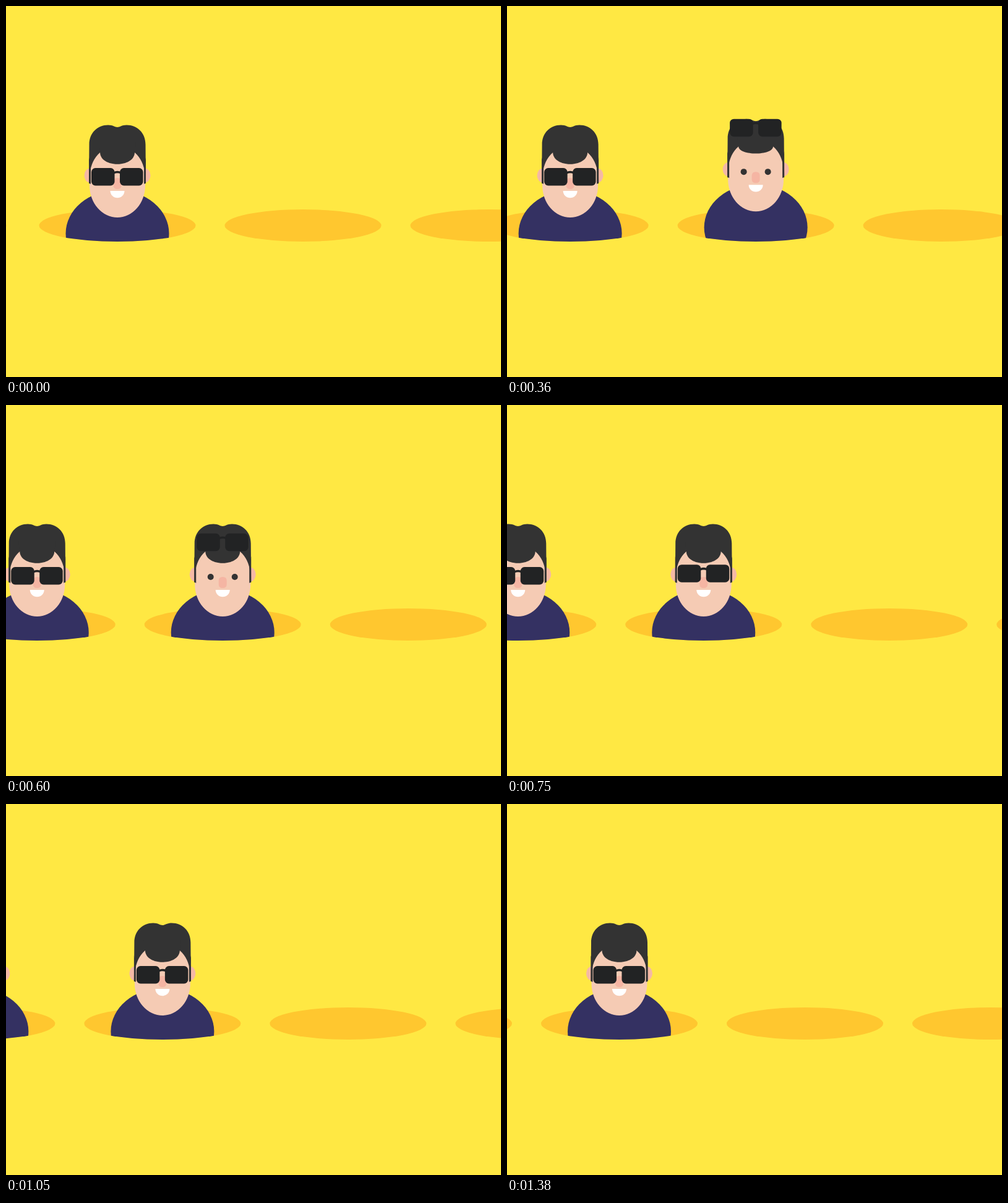
Animation, 800 px wide and 600 px high, one loop 1410 ms. Source, as an HTML page:

```html
<!DOCTYPE html>
<html lang="en">
<head>
<meta charset="utf-8">
<title>Pop up</title>
<style>
  html, body { margin: 0; width: 100%; height: 100%; overflow: hidden; background: #ffe843; }
  svg { display: block; width: 100vw; height: 100vh; }
</style>
</head>
<body>
<svg viewBox="0 0 800 600">
  <defs>
    <ellipse id="hole" cy="355" rx="126.5" ry="26" fill="#ffc72f"/>
    <clipPath id="above">
      <path d="M-126.5 -50H126.5V355A126.5 26 0 0 1 -126.5 355Z"/>
    </clipPath>
    <g id="back">
      <ellipse cy="368" rx="83.5" ry="70" fill="#343162"/>
      <g fill="#f5b9a5">
        <ellipse cx="-44" cy="274" rx="9.5" ry="11.5"/>
        <ellipse cx="44" cy="274" rx="9.5" ry="11.5"/>
      </g>
      <path fill="#333" d="M-46 287L-45.5 224C-45.5 205 -32 192.5 -15 192.5C-7 192.5 -4 196 0 196C4 196 7 192.5 15 192.5C32 192.5 45.5 205 45.5 224L46 287L43 288H-43Z"/>
      <path fill="#f5cbb4" d="M-44.5 275A44.5 49 0 0 1 44.5 275L45 290A45 52 0 0 1 -45 290Z"/>
      <path fill="#333" d="M-46 245L-43 257V288L-46 286ZM46 245L43 257V288L46 286Z"/>
      <circle cx="-19.5" cy="278" r="5" fill="#333"/>
      <circle cx="19.5" cy="278" r="5" fill="#333"/>
      <path fill="#f5b5a3" d="M-6.5 284Q-6.5 278 0 278Q6.5 278 6.5 284V290Q6.5 296 0 296Q-6.5 296 -6.5 290Z"/>
      <path fill="#fff" d="M-11.5 299H11.5A11.5 11.3 0 0 1 -11.5 299Z"/>
    </g>
    <g id="shades" fill="#222324">
      <rect x="-42" y="262" width="37.5" height="28.5" rx="6.5"/>
      <rect x="4" y="262" width="37.5" height="28.5" rx="6.5"/>
      <path d="M-6 270Q0 267 6 270" fill="none" stroke="#222324" stroke-width="3.5"/>
    </g>
  </defs>
  <rect width="800" height="600" fill="#ffe843"/>
  <use href="#hole" x="-126"/>
  <g id="row"></g>
</svg>
<script>
const LOOP = 1410, STEP = 30, SPEED = 298.5 / 1380;
const row = document.getElementById('row');

const spot = (x, inside) => `<g transform="translate(${x})"><use href="#hole"/>${inside}</g>`;
const person = id => `<g clip-path="url(#above)"><g id="${id}">
  <use href="#back"/><path class="fringe" fill="#333"/><use class="glasses" href="#shades"/></g></g>`;

row.innerHTML = spot(180, person('first')) + spot(480, person('second')) + spot(780, '') + spot(1080, '');

// Cubic ease in and out between two times
function ease(t, from, to) {
  const p = Math.min(1, Math.max(0, (t - from) / (to - from)));
  return p < 0.5 ? 4 * p ** 3 : 1 - 4 * (1 - p) ** 3;
}

function pose(id, y, lift, flat) {
  const el = document.getElementById(id);
  const c = 262 - flat;
  el.setAttribute('transform', `translate(0 ${y})`);
  el.querySelector('.glasses').setAttribute('transform', `translate(0 ${lift})`);
  el.querySelector('.fringe').setAttribute('d',
    `M-28 237C-27 ${c} 27 ${c} 28 237L30 220H-30Z`);
}

function draw(t) {
  row.setAttribute('transform', `translate(${-SPEED * t})`);
  const rise = 200 - 210.5 * ease(t, 0, 270);
  const settle = 10.5 * ease(t, 300, 540);
  pose('second', rise + settle, -69.5 * (1 - ease(t, 450, 845)), 10 * (1 - ease(t, 330, 570)));
}

pose('first', 0, 0, 0);
draw(0);

const start = performance.now();
function tick() {
  const t = (performance.now() - start) % LOOP;
  draw(Math.floor(t / STEP) * STEP);
  requestAnimationFrame(tick);
}
requestAnimationFrame(tick);
</script>
</body>
</html>
```
